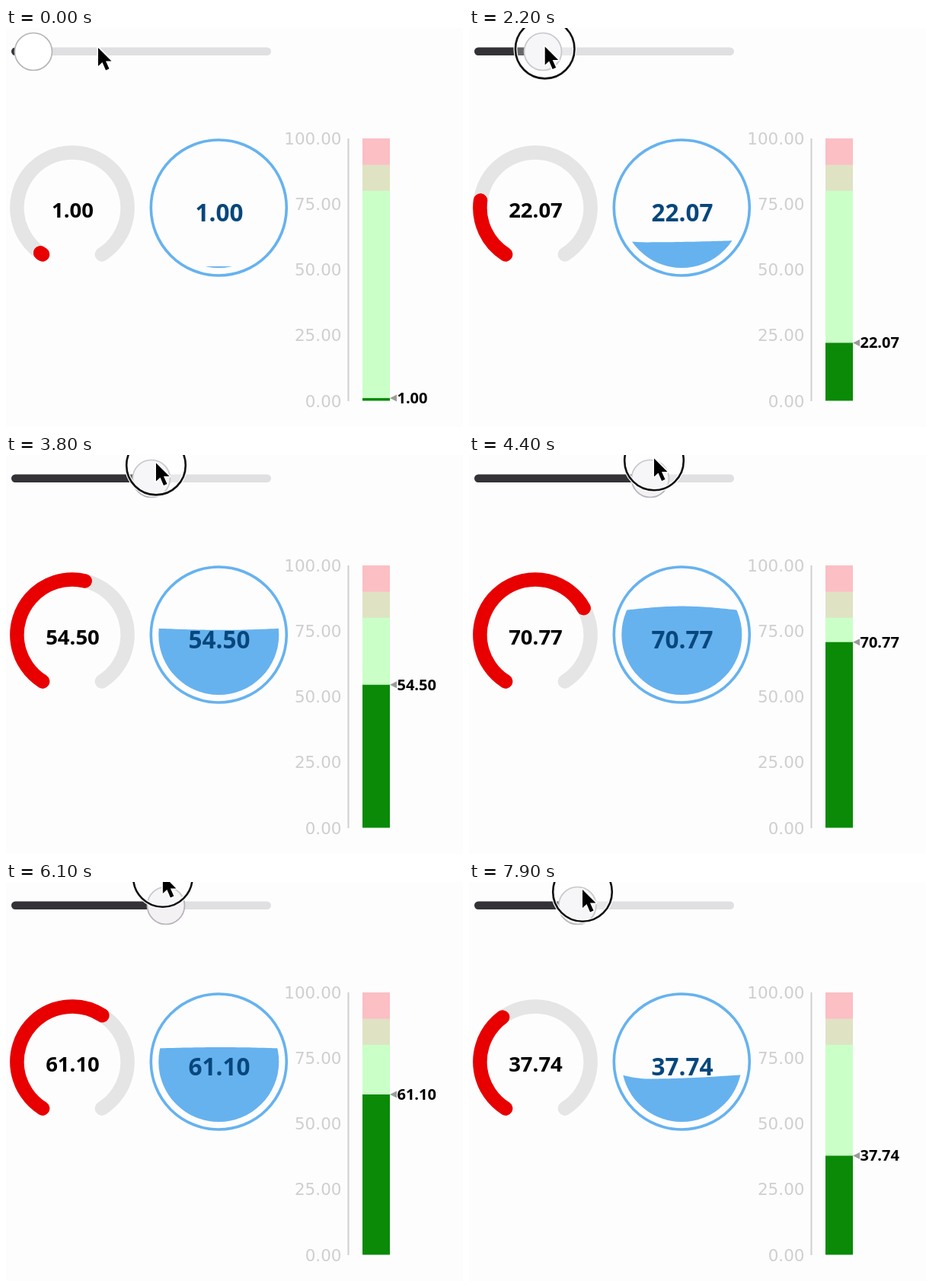
Animation of 600x524 px, one loop 8000 ms. Source, as an HTML page:

```html
<!DOCTYPE html>
<html lang="en">
<head>
<meta charset="utf-8">
<title>Slider and gauges</title>
<style>
  html, body { margin: 0; width: 100%; height: 100%; overflow: hidden; background: #fdfdfe; }
  svg { display: block; width: 600px; height: 524px; }
  .value { font-family: "Open Sans", "Noto Sans", sans-serif; font-weight: 700; }
  .mid { text-anchor: middle; }
  #ticks { font: 21.5px "DejaVu Sans", sans-serif; fill: #cfcfd1; text-anchor: end; }
  .arc { fill: none; stroke-width: 18.5; stroke-linecap: round; }
</style>
</head>
<body>
<svg viewBox="0 0 600 524">
  <defs>
    <clipPath id="bowl"><circle cx="279.3" cy="236" r="79"/></clipPath>
    <path id="dial" d="M48.1 297.4A72.6 72.6 0 1 1 125.9 297.4" pathLength="100"/>
  </defs>

  <rect x="7" y="25.5" width="341" height="10.5" rx="5.2" fill="#e0dfe1"/>
  <rect id="track" x="7" y="25.5" height="10.5" rx="5.2" fill="#343236"/>
  <circle id="thumb" cy="31" r="24.5" stroke="#b6b4b9" stroke-width="1.7"/>

  <use href="#dial" class="arc" stroke="#e5e5e5"/>
  <use id="needle" href="#dial" class="arc" stroke="#e80000"/>
  <text class="value mid" id="dialText" x="87.5" y="249" font-size="27.5"/>

  <circle cx="279.3" cy="236" r="89" fill="none" stroke="#66b2ef" stroke-width="3.6"/>
  <path id="water" clip-path="url(#bowl)" fill="#66b2ef"/>
  <text class="value mid" id="bowlText" x="280" y="253.5" font-size="31.5" fill="#07477c"/>

  <g id="ticks"></g>
  <path d="M449.5 145V490" stroke="#d0d0d2" stroke-width="2"/>
  <rect x="468" y="145" width="36" height="35" fill="#fbbfc4"/>
  <rect x="468" y="179.7" width="36" height="35" fill="#e0e2c4"/>
  <rect x="468" y="213.8" width="36" height="275.7" fill="#caffc7"/>
  <rect id="bar" x="468" width="36" fill="#0a8a06"/>
  <g id="marker">
    <path d="M504 0L513 -4.5V4.5Z" fill="#9b9b9b"/>
    <text class="value" id="barText" x="513.5" y="7" font-size="20"/>
  </g>

  <g id="cursor">
    <g id="press">
      <circle r="38.8" fill="#fff" fill-opacity=".25" stroke="#fff" stroke-width="5"/>
      <circle r="38.8" fill="none" stroke="#111" stroke-width="2.6"/>
    </g>
    <path transform="translate(0 -3)" d="M0 0V24L5.5 19L10 29.5L14.5 27.5L10 17.5H17.5Z"
      stroke="#fff" stroke-width="3.4" stroke-linejoin="round" paint-order="stroke"/>
  </g>
</svg>
<script>
const $ = id => document.getElementById(id);
const set = (id, attrs) => { for (const k in attrs) $(id).setAttribute(k, attrs[k]); };

const LOOP = 8000, STEP = 100, PRESS = 500;

// [time, position] keys
const value = [[0, 1], [900, 1], [1400, 7], [1700, 12.2], [2600, 29.6], [3100, 37.04], [3600, 48.5],
  [4400, 70.77], [4900, 73.2], [5500, 70.39], [6200, 59.2], [6800, 45.89], [7100, 37.7],
  [7500, 28.8], [7900, 37.74]];
const cursorX = [[0, 121], [500, 38], [900, 39], [1400, 57], [1700, 72], [2600, 121], [3100, 143],
  [3600, 179], [4400, 243], [4900, 247], [5500, 236], [6200, 200], [6800, 161], [7100, 137],
  [7450, 114], [7900, 149]];
const cursorY = [[0, 29], [500, 31], [1400, 31], [3100, 20], [4400, 7.5], [5500, -3.5],
  [6800, -7.5], [7900, 13]];

// [value, shape] keys for the water surface
const swell = [[7, 0], [37, 5], [46, 6.5], [70, -6], [100, 0]];
const crest = [[37, .19], [46, .57], [70, .5]];

// Piecewise curve; smooth gives a monotone cubic, otherwise straight lines
function along(keys, t, smooth = true) {
  const last = keys.length - 1;
  if (t <= keys[0][0]) return keys[0][1];
  if (t >= keys[last][0]) return keys[last][1];
  const i = keys.findIndex(k => k[0] > t) - 1;
  const [t0, a] = keys[i], [t1, b] = keys[i + 1];
  const h = t1 - t0, s = (t - t0) / h;
  if (!smooth) return a + (b - a) * s;
  const rate = j => (keys[j + 1][1] - keys[j][1]) / (keys[j + 1][0] - keys[j][0]);
  const slope = j => {
    if (j === 0 || j === last) return rate(Math.min(j, last - 1));
    const p = rate(j - 1), q = rate(j);
    return p * q > 0 ? 2 * p * q / (p + q) : 0;
  };
  const r = 1 - s;
  return a * r * r * (1 + 2 * s) + b * s * s * (3 - 2 * s)
    + h * s * r * (slope(i) * r - slope(i + 1) * s);
}

function waterPath(v) {
  const d = along(swell, v, false), u = along(crest, v, false);
  const top = 314.5 - 1.58 * v - .3 * d;
  let path = "M200 320";
  for (let i = 0; i <= 40; i++) {
    const x = i / 40;
    const s = x < u ? x / u / 2 : .5 + (x - u) / (1 - u) / 2;
    path += `L${200 + 159 * x} ${top + d * Math.sin(Math.PI * s)}`;
  }
  return path + "V320Z";
}

function draw(t) {
  const v = along(value, t), pressed = t >= PRESS;
  const thumbX = 33.1 + 2.895 * v, y = 489.5 - 3.445 * v;
  set("track", { width: thumbX - 7 });
  set("thumb", { cx: thumbX, fill: pressed ? "#f3f1f4" : "#fff" });
  set("needle", { "stroke-dasharray": `${v} 200` });
  set("water", { d: waterPath(v) });
  set("bar", { y, height: 489.5 - y });
  set("marker", { transform: `translate(0 ${y})` });
  for (const id of ["dialText", "bowlText", "barText"]) $(id).textContent = v.toFixed(2);
  set("cursor", { transform: `translate(${along(cursorX, t)} ${along(cursorY, t)})` });
  set("press", { visibility: pressed ? "visible" : "hidden" });
}

$("ticks").innerHTML = [0, 25, 50, 75, 100]
  .map(n => `<text x="440.5" y="${497.5 - 3.445 * n}">${n.toFixed(2)}</text>`).join("");

const start = performance.now();
function tick() {
  const t = (performance.now() - start) % LOOP;
  draw(Math.floor(t / STEP) * STEP);
  requestAnimationFrame(tick);
}
tick();
</script>
</body>
</html>
```
